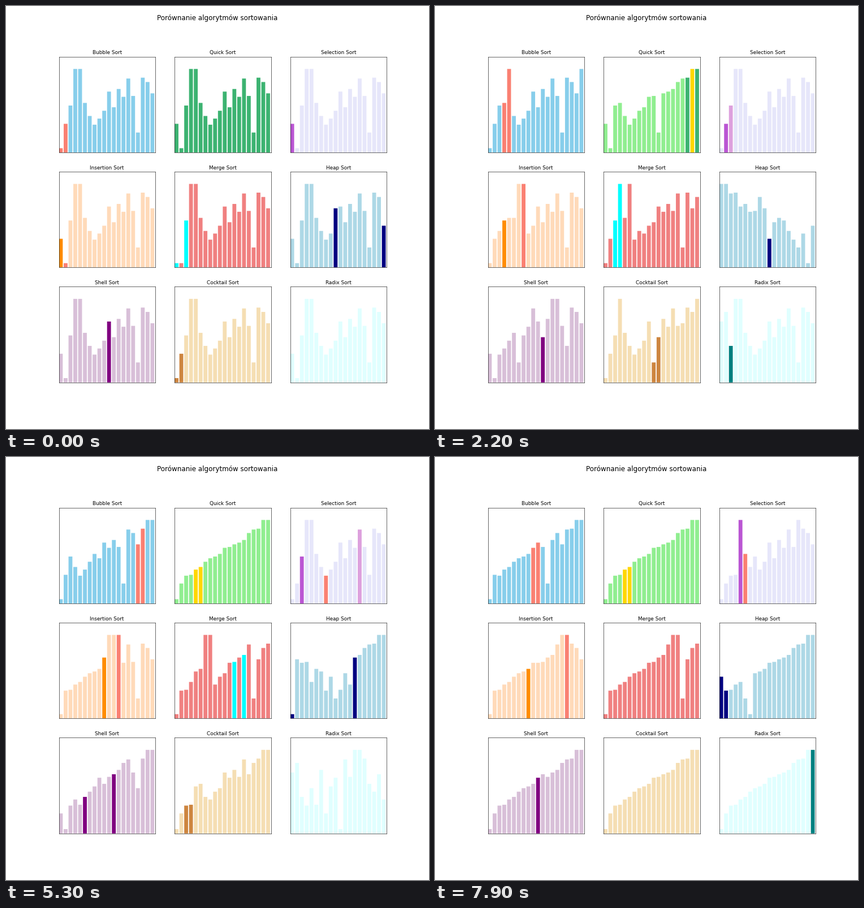
A matplotlib script for the animation above (8000 ms loop, 748 by 748 pixels).

```python
from itertools import islice

import matplotlib.pyplot as plt
from matplotlib.animation import FuncAnimation

SIZE, INCHES = 748, 14
FRAMES, INTERVAL = 80, 100
DATA = [33, 5, 54, 96, 96, 57, 42, 32, 39, 48,
        70, 52, 73, 64, 85, 65, 23, 86, 81, 68]
N = len(DATA)


# Each sorter works in place and yields {index: colour} for every step.

def paint(color, *idx):
    return dict.fromkeys(idx, color)


def swap(a, i, j):
    a[i], a[j] = a[j], a[i]


def bubble(a):
    for end in range(N - 1, 0, -1):
        for j in range(end):
            if a[j] > a[j + 1]:
                swap(a, j, j + 1)
            yield paint("salmon", j, j + 1)


def quick(a):
    stack = [(0, N - 1)]
    while stack:
        low, high = stack.pop()
        if low >= high:
            continue
        outside = paint("lightgreen", *range(low), *range(high + 1, N))
        yield outside
        p = low
        for j in range(low, high):
            if a[j] <= a[high]:
                swap(a, p, j)
                yield outside | paint("gold", p, j)
                p += 1
        swap(a, p, high)
        yield outside | paint("gold", p, high)
        stack += [(low, p - 1), (p + 1, high)]


def selection(a):
    for i in range(N - 1):
        best = i
        yield {i: "mediumorchid"}
        for j in range(i + 1, N):
            if a[j] < a[best]:
                best = j
            yield {j: "plum"} | {best: "salmon"} | {i: "mediumorchid"}
        swap(a, i, best)
        yield {best: "salmon"} | {i: "mediumorchid"}


def insertion(a):
    for i in range(1, N):
        key, j = a[i], i - 1
        yield {i: "salmon", j: "darkorange"}
        while j >= 0 and a[j] > key:
            a[j + 1] = a[j]
            j -= 1
            yield {i: "salmon", j: "darkorange"}
        a[j + 1] = key
        yield {i: "salmon"} | {j + 1: "darkorange"}


def merge(a):
    width = 1
    while width < N:
        for low in range(0, N, 2 * width):
            mid, high = min(low + width, N), min(low + 2 * width, N)
            old, i, j = a[:], low, mid
            for k in range(low, high):
                if j >= high or (i < mid and old[i] <= old[j]):
                    a[k] = old[i]
                    i += 1
                else:
                    a[k] = old[j]
                    j += 1
                yield paint("cyan", i, j)
        width *= 2


def sift(a, n, i):
    while True:
        top = i
        for child in (2 * i + 1, 2 * i + 2):
            if child < n and a[child] > a[top]:
                top = child
        swap(a, i, top)
        yield paint("navy", i, top)
        if top == i:
            return
        i = top


def heap(a):
    for i in range(N // 2 - 1, -1, -1):
        yield from sift(a, N, i)
    for end in range(N - 1, 0, -1):
        swap(a, 0, end)
        yield paint("navy", 0, end)
        yield from sift(a, end, 0)


def shell(a):
    gap = N // 2
    while gap:
        for i in range(gap, N):
            key, j = a[i], i
            while j >= gap and a[j - gap] > key:
                a[j] = a[j - gap]
                j -= gap
                yield paint("purple", i, j)
            a[j] = key
            yield paint("purple", i, j)
        gap //= 2


def cocktail(a):
    low, high, moved = 0, N - 1, True
    while moved:
        moved = False
        there, back = range(low, high), range(high - 2, low - 1, -1)
        for j in [*there, *back]:
            if a[j] > a[j + 1]:
                swap(a, j, j + 1)
                moved = True
                yield paint("peru", j, j + 1)
        low, high = low + 1, high - 1
    yield {}


def radix(a):
    for unit in (1, 10):
        for _ in range(N):
            yield {}
        for k, v in enumerate(sorted(a, key=lambda v: v // unit % 10)):
            a[k] = v
            yield {k: "teal"}


SORTS = [
    ("Bubble Sort", bubble, "skyblue"),
    ("Quick Sort", quick, "mediumseagreen"),
    ("Selection Sort", selection, "lavender"),
    ("Insertion Sort", insertion, "peachpuff"),
    ("Merge Sort", merge, "lightcoral"),
    ("Heap Sort", heap, "lightblue"),
    ("Shell Sort", shell, "thistle"),
    ("Cocktail Sort", cocktail, "wheat"),
    ("Radix Sort", radix, "lightcyan"),
]


def record(sorter, base):
    """List (heights, colours) for every frame, holding the last step."""
    a = DATA[:]
    steps = [(a[:], [marks.get(i, base) for i in range(N)])
             for marks in islice(sorter(a), FRAMES)]
    return steps + steps[-1:] * (FRAMES - len(steps))


fig, axes = plt.subplots(3, 3, figsize=(INCHES, INCHES), dpi=SIZE / INCHES)
fig.suptitle("Porównanie algorytmów sortowania", fontsize=16)

panels = []
for ax, (title, sorter, base) in zip(axes.flat, SORTS):
    ax.set_title(title, fontsize=12)
    bars = ax.bar(range(N), DATA, align="edge", color=base, snap=False)
    ax.set(xlim=(0, N), ylim=(0, 110), xticks=[], yticks=[])
    panels.append((bars, record(sorter, base)))


def update(frame):
    for bars, steps in panels:
        for bar, height, color in zip(bars, *steps[frame]):
            bar.set_height(height)
            bar.set_facecolor(color)
    return []


anim = FuncAnimation(fig, update, frames=FRAMES, interval=INTERVAL,
                     repeat=True, repeat_delay=0)
plt.show()
```
